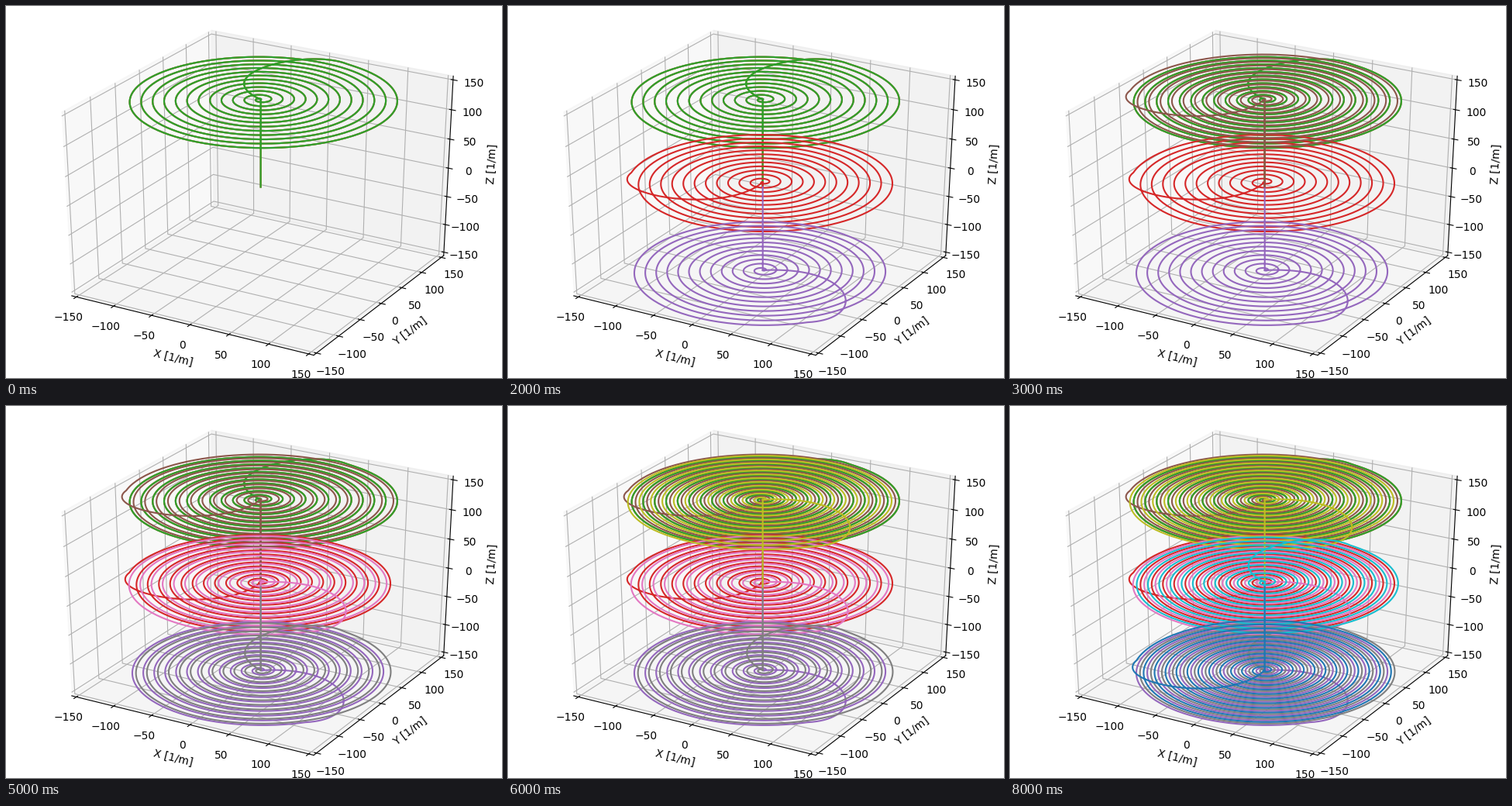
A matplotlib script for the animation above (9000 ms loop, 640 by 480 pixels).

```python
import numpy as np
import matplotlib.pyplot as plt
from matplotlib.animation import FuncAnimation

SHOTS = 9
PITCH = 12.5                # radial gain per turn, 1/m
TURNS = 12.06
PLANES = (147, 8.3, -147)   # kz levels, 1/m
END_ANGLE = 79              # where the first interleave ends, degrees
LIMIT = 150 * 25 / 24


def bezier(p0, p1, p2, p3, n=80):
    t = np.linspace(0, 1, n)
    return ((1 - t)**3 * p0 + 3 * t * (1 - t)**2 * p1
            + 3 * t**2 * (1 - t) * p2 + t**3 * p3)


def readout():
    """Spiral in the complex plane ending on the real axis, then a rewind."""
    turn = np.linspace(0, TURNS, 2400)
    spiral = PITCH * turn * np.exp(2j * np.pi * (turn - TURNS))
    rewind = bezier(PITCH * TURNS, 166 + 70j, 22 + 104j, 0)
    return np.concatenate((spiral, rewind))


def trajectory(shot):
    plane, group = shot % 3, shot // 3
    turned = readout() * np.exp(1j * np.radians(END_ANGLE + 120 * (plane + group)))
    k = np.r_[0, turned]
    kz = np.full(len(k), PLANES[plane], float)
    kz[0] = 0
    return k.real, k.imag, kz


fig = plt.figure(figsize=(6.4, 4.8), dpi=100)
ax = fig.add_axes([0, 0, 1, 1], projection="3d")
ax.apply_aspect = lambda position=None: None    # stretch to the whole figure
ax.set_box_aspect((1, 1, 1), zoom=3**0.5 / 1.8294640721620434)
ax.view_init(elev=30, azim=-60)
ax.set(xlim=(-LIMIT, LIMIT), ylim=(-LIMIT, LIMIT), zlim=(-LIMIT, LIMIT),
       xlabel="X [1/m]", ylabel="Y [1/m]", zlabel="Z [1/m]")
ax.set_title("k-space Acquisition")

# The first shot is laid down three times, using up three cycle colours.
order = [0, 0] + list(range(SHOTS))
lines = [ax.plot(*trajectory(shot), color=f"C{i % 10}")[0]
         for i, shot in enumerate(order)]


def update(frame):
    for shot, line in zip(order, lines):
        line.set_visible(shot <= frame)
    return lines


anim = FuncAnimation(fig, update, frames=SHOTS, interval=1000,
                     repeat=True, repeat_delay=0)
plt.show()
```
